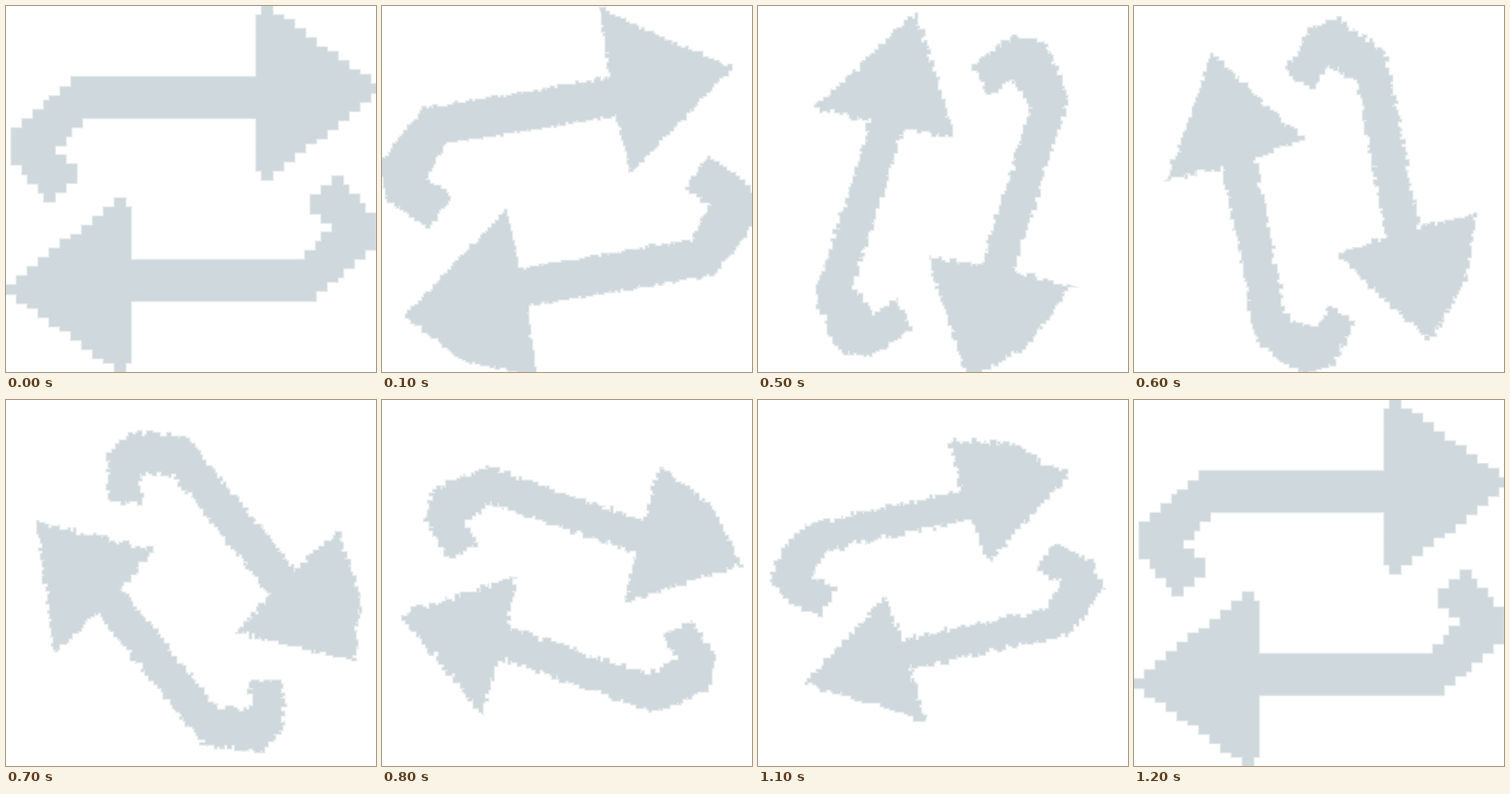
Recreate the animation shown at these times as an HTML page with a canvas. Size 495 by 489 pixels, loop 1300 ms.

```html
<!DOCTYPE html>
<html lang="en">
<head>
<meta charset="utf-8">
<title>Turning arrows</title>
<style>
html, body { margin: 0; width: 100%; height: 100%; overflow: hidden; background: #fff; }
canvas { display: block; }
</style>
</head>
<body>
<canvas id="stage" width="495" height="489"></canvas>
<script>
const W = 495, H = 489;
const ctx = document.getElementById('stage').getContext('2d');
const FILL = '#cfd8dc', EDGE = '#e6ebed';
const STEP = 100, STEPS = 13, CELL = 2.45;

const mix = (a, b, k) => a + (b - a) * k;

// Stepped arrow on a coarse grid: each corner is [x, y, stairs, drop first].
function crispArrow() {
  const corners = [
    [47, 2], [47, 0], [49, 0],
    [69, 17, 10, true], [69, 19], [49, 38, 10], [47, 38], [47, 36], [46, 36],
    [46, 24.5], [14, 24.5], [9, 30.5, 3, true], [9, 32.6],
    [13, 36.6, 2], [13, 38.7], [9, 42.8, 2], [7, 42.8],
    [1, 34.7, 4, true], [1, 26.7], [12, 15.5, 6], [46, 15.5]
  ];
  const path = new Path2D();
  let x = 46, y = 2;
  const line = (u, v) => path.lineTo(u * W / 68, v * H / 80);
  path.moveTo(x * W / 68, y * H / 80);
  for (const [u, v, stairs = 1, drop] of corners) {
    let px = x, py = y;
    for (let n = 1; n <= stairs; n++) {
      const last = n === stairs;
      const nx = last ? u : x + Math.round((u - x) * n / stairs);
      const ny = last ? v : y + Math.round((v - y) * n / stairs);
      if (drop) line(px, ny);
      else line(nx, py);
      line(px = nx, py = ny);
    }
    x = u;
    y = v;
  }
  path.closePath();
  return path;
}
const crisp = crispArrow();

// Smooth arrow around the centre of the pair; bow rounds its leading edge.
const outline = bow => [
  [88, -244], [166 + bow * 0.57, -188 - bow * 0.82], [246, -133], [88, -12],
  [84, -95], [-151, -95], [-185, -50], [-156, -21], [-193, 17],
  [-241, -32], [-243, -80], [-207, -118], [-171, -148], [84, -148]
];
const pair = [outline(0), outline(25).map(([u, v]) => [-u, -v])];

// The pair turns while it shrinks, skews a little and drifts.
const keys = [
  { at: 0, deg: 0, long: 1, wide: 1, skew: 0, x: 251, y: 244.5 },
  { at: 3, deg: 30, long: 0.98, wide: 0.86, skew: 0.03, x: 246, y: 256 },
  { at: 5, deg: 75, long: 0.95, wide: 0.82, skew: 0.045, x: 246, y: 255 },
  { at: 7, deg: 132, long: 0.88, wide: 0.81, skew: 0.045, x: 254, y: 256 },
  { at: 9, deg: 195, long: 0.86, wide: 0.78, skew: 0.03, x: 251, y: 250 },
  { at: 11, deg: 195, long: 0.855, wide: 0.735, skew: 0.042, x: 239.5, y: 240 }
];

function poseAt(step) {
  const i = keys.findIndex(key => key.at >= step);
  const a = keys[i - 1], b = keys[i], pose = {};
  for (const name in a) pose[name] = mix(a[name], b[name], (step - a.at) / (b.at - a.at));
  return pose;
}

function place([u, v], { deg, long, wide, skew, x, y }) {
  const a = deg * Math.PI / 180, c = Math.cos(a), s = Math.sin(a);
  const p = u * long + v * skew, q = u * skew + v * wide;
  return [x + p * c + q * s, y - p * s + q * c];
}

function random(seed) {
  return () => {
    seed = (seed * 1664525 + 1013904223) >>> 0;
    return seed / 4294967296;
  };
}

// Outline walked in short strides with small offsets, snapped to square cells.
function ragged(points, amp, rnd) {
  const path = new Path2D();
  const jog = v => Math.round((v + (rnd() + rnd() - 1) * amp) / CELL) * CELL;
  let lastY = null;
  points.forEach(([x, y], i) => {
    const [u, v] = points[(i + 1) % points.length];
    const count = Math.max(1, Math.round(Math.hypot(u - x, v - y) / 3.5));
    for (let n = 0; n < count; n++) {
      const px = jog(mix(x, u, n / count)), py = jog(mix(y, v, n / count));
      if (lastY === null) path.moveTo(px, py);
      else path.lineTo(px, lastY);
      path.lineTo(px, py);
      lastY = py;
    }
  });
  path.closePath();
  return path;
}

function paint(path) {
  ctx.strokeStyle = EDGE;
  ctx.lineWidth = 3;
  ctx.stroke(path);
  ctx.fillStyle = FILL;
  ctx.fill(path);
}

function draw(step) {
  ctx.fillStyle = '#fff';
  ctx.fillRect(0, 0, W, H);
  if (step % 12 === 0) {
    paint(crisp);
    ctx.save();
    ctx.translate(502, H);
    ctx.rotate(Math.PI);
    paint(crisp);
    ctx.restore();
    return;
  }
  const rnd = random(step * 977 + 5);
  const amp = Math.min(5, 2.5 + step * 0.4);
  const pose = poseAt(step);
  for (const arrow of pair) paint(ragged(arrow.map(p => place(p, pose)), amp, rnd));
}

let shown = -1;
const start = performance.now();
function tick() {
  const step = Math.floor((performance.now() - start) / STEP) % STEPS;
  if (step !== shown) draw(shown = step);
  requestAnimationFrame(tick);
}
tick();
</script>
</body>
</html>
```
